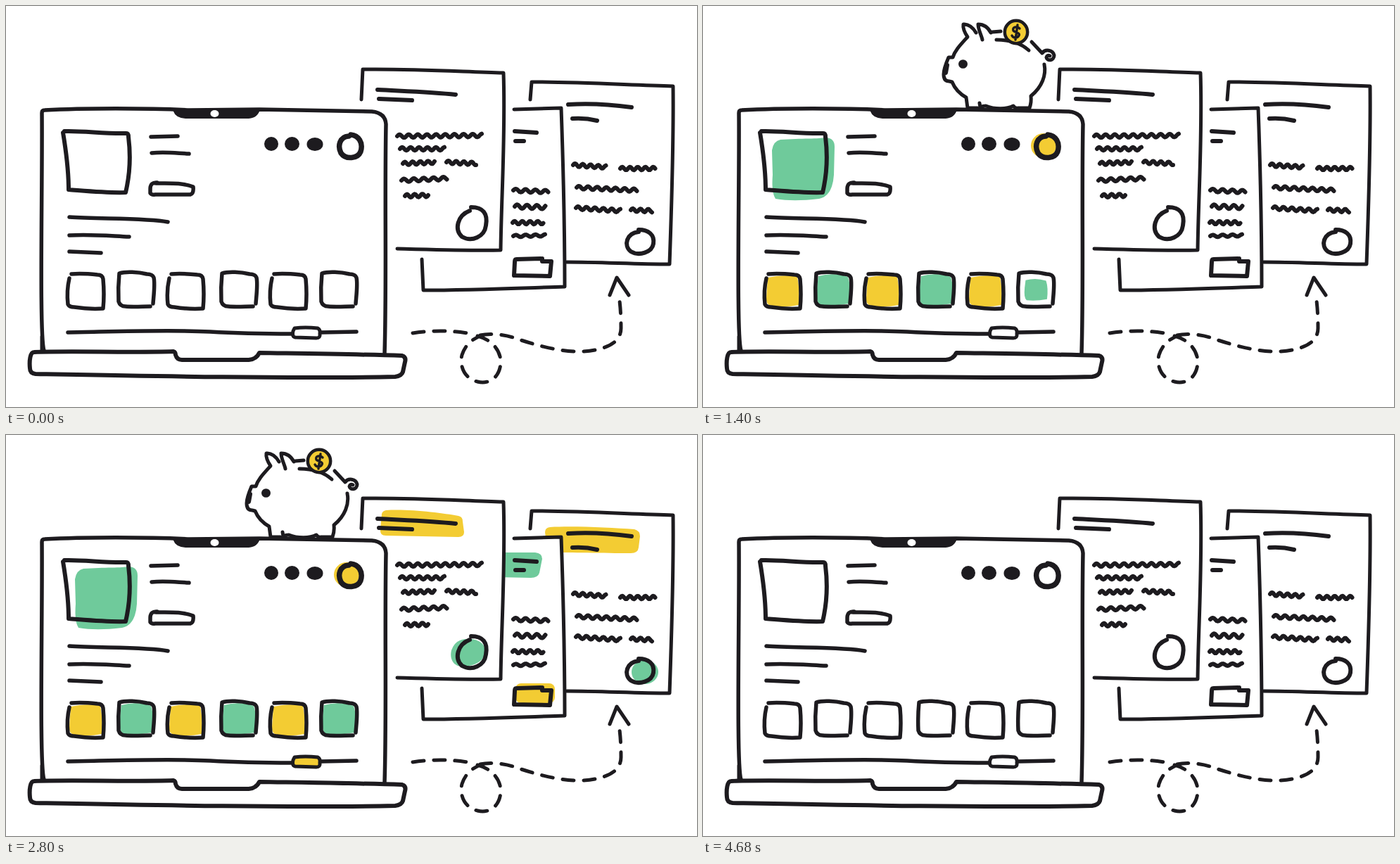
An HTML page for the animation above (4800 ms loop, 982 by 570 pixels).

```html
<!DOCTYPE html>
<html lang="en">
<head>
<meta charset="utf-8">
<title>Laptop and papers</title>
<style>
  html, body { margin: 0; width: 100%; height: 100%; overflow: hidden; background: #fff; }
  svg { display: block; width: 982px; height: 570px; }
</style>
</head>
<body>
<svg id="stage" viewBox="0 0 982 570" fill="none" stroke-linecap="round" stroke-linejoin="round"></svg>
<script>
const INK = '#1d1b1f', GREEN = '#6fca9b', YELLOW = '#f3cc33';
const LOOP = 4800, STEP = 40, TURN = 3440, POP = 320;
const stage = document.getElementById('stage');
const moves = [];

function add(tag, attrs, parent = stage) {
  const el = document.createElementNS('http://www.w3.org/2000/svg', tag);
  for (const key in attrs) el.setAttribute(key, attrs[key]);
  return parent.appendChild(el);
}
const line = (d, w = 5.5, parent = stage) => add('path', { d, stroke: INK, 'stroke-width': w }, parent);
const fill = (d, color = '#fff', parent = stage) => add('path', { d, fill: color }, parent);
const oval = (cx, cy, rx, ry, color, parent = stage) => add('ellipse', { cx, cy, rx, ry, fill: color }, parent);

const ease = p => (1 - Math.cos(Math.PI * Math.min(1, Math.max(0, p)))) / 2;

// Grows a shape about a fixed point
function pop(el, cx, cy, start, span = POP, scaleAt = ease) {
  moves.push(time => {
    const s = scaleAt((time - start) / span);
    el.setAttribute('visibility', s > 0.005 ? 'visible' : 'hidden');
    el.setAttribute('transform', `translate(${cx} ${cy}) scale(${s}) translate(${-cx} ${-cy})`);
  });
}

// Uncovers a shape from left to right
let clips = 0;
function wipe(el, x, width, start) {
  const id = 'wipe' + clips++;
  const clip = add('clipPath', { id });
  const box = add('rect', { x, y: 0, width: 0, height: 570 }, clip);
  el.setAttribute('clip-path', `url(#${id})`);
  moves.push(time => box.setAttribute('width', width * ease((time - start) / POP)));
}

function squiggle(x1, y1, x2, y2, wave = 11, amp = 2.3) {
  const len = x2 - x1;
  let d = '';
  for (let x = 0; x <= len; x += 1.5) {
    const y = y1 + (y2 - y1) * x / len - amp * Math.sin(x / wave * 2 * Math.PI);
    d += `${d ? 'L' : 'M'}${(x1 + x).toFixed(1)} ${y.toFixed(1)}`;
  }
  line(d, 6);
}

function rightPaper() {
  fill('M747 108C810 108 880 112 948 114C949 200 946 280 943 367L747 364Z');
  wipe(fill('M773 131C810 129 860 132 893 134Q901 136 901 144L899 160Q898 168 888 168C850 168 800 167 775 167Q766 165 768 155L766 138Q766 132 773 131Z', YELLOW), 766, 136, 1590);
  pop(oval(908, 337, 19, 17, GREEN), 906, 336, 2240, 240);
  line('M745 133L747 108C810 108 880 112 948 114C949 200 946 280 943 367C895 367 845 364 797 364', 5);
  line('M799 140C830 138 860 140 889 144M805 160C818 159 828 160 840 163', 6);
  squiggle(806, 226, 853, 229);
  squiggle(873, 231, 923, 231);
  squiggle(811, 258, 897, 262, 13);
  squiggle(810, 287, 873, 291, 12);
  squiggle(888, 290, 918, 291);
  line('M899 321C882 323 877 340 888 349C900 356 918 350 920 338C922 325 913 318 899 318', 6);
}

function middlePaper() {
  fill('M591 145H789C792 230 794 320 794 399L593 404Z');
  wipe(fill('M700 167H752Q762 168 762 176L758 196Q756 203 746 203L700 202Z', GREEN), 708, 56, 1660);
  pop(add('rect', { x: 724, y: 353, width: 56, height: 28, rx: 8, fill: YELLOW }), 752, 367, 2040);
  line('M722 147L789 145C792 230 794 320 794 399C730 401 660 404 593 404L591 360', 5);
  line('M723 178L754 180M724 192H736', 6);
  squiggle(721, 262, 771, 264, 14);
  squiggle(723, 285, 767, 286, 14, 2.8);
  squiggle(720, 308, 764, 308);
  squiggle(721, 327, 766, 326, 14, 1.5);
  line('M760 359L725 360Q723 360 723 364L722 383L773 384L775 363H762V359', 6);
}

function leftPaper() {
  fill('M507 90C580 89 640 93 707 95C710 180 704 270 703 347L507 344Z');
  wipe(fill('M540 107C575 105 620 111 643 115Q649 116 649 123L651 138Q651 145 643 145L540 143Q531 143 532 134L534 112Q535 108 540 107Z', YELLOW), 531, 121, 1600);
  pop(fill('M645 292C660 286 682 292 681 308C680 320 668 329 648 329C636 329 630 318 633 306Q637 295 645 292Z', GREEN), 660, 312, 1895);
  line('M505 133L507 90C580 89 640 93 707 95C710 180 704 270 703 347C660 348 600 346 556 345', 5);
  line('M528 119C565 121 605 122 639 126M530 132L577 134', 6);
  squiggle(556, 185, 677, 184, 13);
  squiggle(560, 203, 624, 203, 12);
  squiggle(564, 224, 610, 222);
  squiggle(626, 222, 669, 224);
  squiggle(562, 248, 627, 245, 14);
  squiggle(567, 270, 601, 269);
  line('M659 291C641 298 637 318 648 328C662 336 680 328 682 312C685 295 678 286 661 286', 6);
}

function tile(i) {
  const even = i % 2;
  const x = [0, 0, 142, 146, 288, 288][i];
  const g = add('g', { transform: `translate(${x} 0)` });
  const paint = even
    ? fill('M164 384Q185 378 206 385Q211 400 208 423Q185 427 166 425Q160 420 162 400Z', GREEN, g)
    : fill('M92 386Q115 381 134 385Q138 405 136 425Q118 429 98 426Q89 425 90 415Z', YELLOW, g);
  pop(paint, even ? 185 : 113, even ? 403 : 406, 400 + 160 * i);
  line(even
    ? 'M209 423C210 410 212 395 210 386Q208 381 200 381C188 378 170 377 161 380Q159 400 160 420Q162 427 170 427C180 428 195 427 205 427'
    : 'M90 387C87 400 87 415 88 424Q90 428 97 428C110 430 125 431 138 430Q140 410 138 388Q137 382 130 382C120 381 105 380 93 381', 5.5, g);
}

function laptop() {
  fill('M51 148H520Q540 150 540 168L538 494H51Z');
  line('M54 490C47 470 52 250 51 152Q51 148 55 148C110 145 200 145 262 148L360 147L520 150Q539 152 540 168C538 270 541 400 538 494');
  line('M51 470L51 490', 5);
  fill('M238 146L361 147Q358 159 345 160H255Q241 159 238 150Z', INK);
  oval(296.5, 153, 6, 5, '#fff');

  pop(fill('M110 190C140 188 165 189 175 187Q187 188 187 200L186 240Q184 270 165 274C140 277 120 277 103 274Q97 265 99 240L98 205Q100 192 110 190Z', GREEN), 142, 232, 260);
  line('M83 178C110 177 140 182 171 181Q174 181 174 186C177 210 176 240 170 265C145 266 115 263 89 261C89 240 86 210 81 180', 6);
  line('M206 186L244 185M207 209C225 207 240 209 260 210');
  line('M215 251Q205 250 205 260V266Q207 269 212 268H262Q267 267 266 257C250 251 235 252 213 252');
  line('M90 300C130 303 200 301 230 307M90 326C120 324 150 327 175 328M90 349L135 351');

  oval(377, 196, 10, 10, INK);
  oval(406.5, 196, 10.5, 10, INK);
  oval(439, 196.5, 11.5, 9.5, INK);
  pop(oval(484, 198.5, 18, 17.5, YELLOW), 488, 200, 560);
  line('M487 185C474 186 471 199 476 209C483 219 500 217 504 207C508 194 501 184 490 183', 7.5);

  for (let i = 0; i < 6; i++) tile(i);

  line('M88 464C150 463 230 460 290 463C340 466 370 466 407 466M448 464L498 463');
  pop(add('rect', { x: 410, y: 459, width: 35, height: 12, fill: YELLOW }), 427, 465, 1400);
  line('M410 458Q425 456 443 458Q447 460 446 466Q447 472 441 472L411 471Q406 470 408 462Z', 5);

  const base = line('M40 492C90 490 180 493 238 491Q241 492 241 496Q243 503 250 503H345Q356 502 360 493C420 494 500 495 563 497Q569 499 567 506L564 520Q562 526 553 527C400 530 200 526 42 523Q34 522 34 515C33 505 34 492 40 492Z', 6);
  base.setAttribute('fill', '#fff');
}

function dashedArrow() {
  for (const d of [
    'M578 465C605 461 630 461 656 465',
    'M670 469C690 474 704 490 703 508C701 530 685 538 670 534C652 530 644 512 648 496C652 483 662 472 680 467',
    'M674 468C690 464 715 468 732 475C760 484 790 492 820 491C850 489 874 480 874 458C874 440 873 425 871 412'
  ]) line(d, 5).setAttribute('stroke-dasharray', '16 14');
  line('M858 411L868 386L885 411', 5);
}

function pig() {
  const g = add('g', {});
  fill('M376 44C372 38 369 32 370 26C377 25 384 31 388 38L391 26C400 26 406 32 409 38L463 56L482 66C488 90 486 112 466 128L464 145H448L441 142C430 147 414 147 402 142L390 146H376L374 130C367 126 358 118 354 109L345 107Q339 96 349 73H355C358 63 366 55 374 47Z', '#fff', g);
  line('M388 38C384 31 377 25 370 26C369 32 372 38 376 44C366 55 358 63 355 73H349C346 80 342 90 342 97C342 104 345 107 350 107L354 108C358 118 367 126 374 130L376 145H390', 5, g);
  line('M393 138L394 144Q398 142 402 142C414 147 432 147 441 142Q444 146 448 145H464Q467 137 466 128C482 115 488 98 485 83', 5, g);
  line('M397 48C396 42 391 34 391 26C400 26 406 32 409 38M411 37L423 36', 5, g);
  line('M417 48C438 48 452 53 463 63M467 51L482 67C486 61 497 62 499 70C499 78 489 79 488 73Q489 69 493 71', 5, g);
  line('M347 84L345 95', 6, g);
  oval(369.5, 82.5, 6.5, 6.3, INK, g);
  const coin = oval(445, 37, 16.2, 16.2, YELLOW, g);
  coin.setAttribute('stroke', INK);
  coin.setAttribute('stroke-width', 4.5);
  line('M450 32C446 28 439 30 441 35C444 38 451 38 449 42C447 46 441 46 439 42M447 27L444 48', 3.4, g);

  // Overshoots, then settles
  const bounce = p => p < 1 ? 1.16 * ease(p) : 1.16 - 0.16 * ease((p - 1) / 0.6);
  pop(g, 456, 143, 676, 283, bounce);
}

rightPaper();
middlePaper();
leftPaper();
laptop();
dashedArrow();
pig();

// After the turn everything runs backwards at twice the speed
function draw(now) {
  const t = Math.floor(now % LOOP / STEP) * STEP;
  const time = t < TURN ? t : 240 + 2 * Math.max(0, 4680 - t);
  for (const move of moves) move(time);
}
const began = performance.now();
function tick() {
  draw(performance.now() - began);
  requestAnimationFrame(tick);
}
tick();
</script>
</body>
</html>
```
